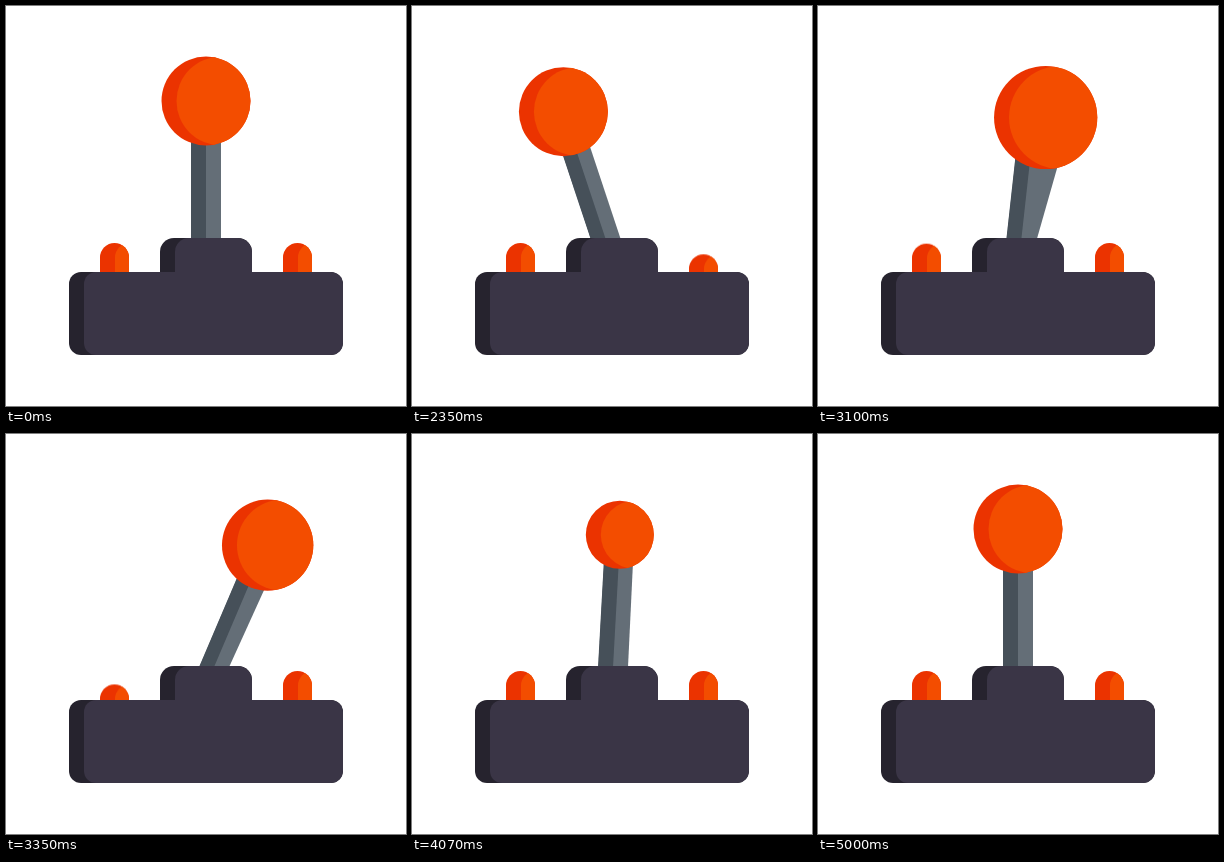
An HTML page without scripts that plays this animation: 400x400 px, repeating every 5.02 s.

```html
<!DOCTYPE html>
<html lang="en">
<head>
<meta charset="utf-8">
<title>Joystick</title>
<style>
@property --x { syntax: "<length>"; inherits: true; initial-value: 200px; }
@property --y { syntax: "<length>"; inherits: true; initial-value: 95px; }
@property --r { syntax: "<length>"; inherits: true; initial-value: 44.5px; }

html, body { margin: 0; width: 100%; height: 100%; overflow: hidden; background: #fff; }

.stage {
  --loop: 5020ms;
  --shade: 15px;
  position: relative;
  width: 400px;
  height: 400px;
  overflow: hidden;
  animation: swing-x var(--loop) infinite, swing-y var(--loop) infinite, depth var(--loop) infinite;
}
.stage div, .stage div::after { position: absolute; box-sizing: border-box; }
.stage div { overflow: hidden; }
.stage div::after { content: ""; inset: 0; }

/* Stick: quad from the ball centre down into the collar */
.stick {
  --half: max(14.5px, calc(15px + (var(--r) - 44.5px) * 1.53));
  --foot: calc(200px + (var(--x) - 200px) * .11);
  --left: calc(var(--x) - var(--half));
  inset: 0;
  background: #646e77;
  clip-path: polygon(
    var(--left) var(--y),
    calc(var(--x) + var(--half)) var(--y),
    calc(var(--foot) + 15px) 236px,
    calc(var(--foot) - 15px) 236px);
}
.stick::after {
  background: #465059;
  clip-path: polygon(
    var(--left) var(--y),
    calc(var(--left) + var(--shade)) var(--y),
    var(--foot) 236px,
    calc(var(--foot) - 15px) 236px);
}

.ball {
  inset: 0;
  background: #eb3300;
  clip-path: circle(var(--r) at var(--x) var(--y));
}
.ball::after {
  background: #f34d00;
  clip-path: circle(var(--r) at calc(var(--x) + var(--shade)) var(--y));
}

/* Solid parts: dark body with the same shape shifted right on top */
.stage .solid::after { left: var(--shade); border-radius: inherit; }
.base, .collar { background: #26232e; }
.base::after, .collar::after { background: #3a3546; }
.base { left: 63px; top: 266px; width: 274px; height: 83px; border-radius: 12px; }
.collar { left: 154px; top: 232px; width: 92px; height: 35px; border-radius: 14px 14px 0 0; }

.button {
  top: 237px;
  width: 29px;
  height: 30px;
  border-radius: 14.5px 14.5px 0 0;
  background: #eb3300;
}
.stage .button::after { right: -15px; background: #f34d00; }
.one { left: 94px; animation: press-left var(--loop) infinite; }
.two { left: 277px; animation: press-right var(--loop) infinite; }

@keyframes swing-x {
  0%, 39.8% { --x: 200px; animation-timing-function: cubic-bezier(.42, 0, .58, 1); }
  50.1% { --x: 138.5px; animation-timing-function: cubic-bezier(.5, 0, .5, 1); }
  69.3% { --x: 265px; animation-timing-function: cubic-bezier(.6, 0, .5, 1); }
  85.1%, 100% { --x: 200px; }
}
@keyframes swing-y {
  0%, 39.8% { --y: 95px; animation-timing-function: cubic-bezier(.6, 0, .6, 1); }
  50.1% { --y: 110px; animation-timing-function: linear; }
  61.8% { --y: 111.5px; animation-timing-function: linear; }
  69.3% { --y: 111px; animation-timing-function: ease-in-out; }
  74.3% { --y: 114px; animation-timing-function: cubic-bezier(.42, 0, .58, 1); }
  85.3% { --y: 95px; animation-timing-function: cubic-bezier(.4, 0, .7, 1); }
  89.4% { --y: 111.2px; animation-timing-function: cubic-bezier(.45, 0, .55, 1); }
  99.6%, 100% { --y: 95px; }
}
@keyframes depth {
  0%, 50.1% { --r: 44.5px; animation-timing-function: cubic-bezier(.42, 0, .8, .9); }
  59.8% { --r: 53.5px; animation-timing-function: cubic-bezier(.3, .2, .6, 1); }
  69.5% { --r: 44.5px; animation-timing-function: cubic-bezier(.3, .3, .5, 1); }
  78.7%, 81.7% { --r: 34px; animation-timing-function: cubic-bezier(.42, 0, .58, 1); }
  89.2% { --r: 53.5px; animation-timing-function: cubic-bezier(.45, 0, .55, 1); }
  99.6%, 100% { --r: 44.5px; }
}
@keyframes press-left {
  0%, 61% { transform: none; animation-timing-function: ease-in-out; }
  66% { transform: translateY(14px); animation-timing-function: ease-in-out; }
  71.3%, 100% { transform: none; }
}
@keyframes press-right {
  0%, 40.2% { transform: none; animation-timing-function: ease-in-out; }
  45.2% { transform: translateY(14px); animation-timing-function: ease-in-out; }
  50.6%, 89.7% { transform: none; animation-timing-function: ease-in-out; }
  94.6% { transform: translateY(14px); animation-timing-function: ease-in-out; }
  99.5%, 100% { transform: none; }
}
</style>
</head>
<body>
<main class="stage">
  <div class="stick"></div>
  <div class="ball"></div>
  <div class="solid button one"></div>
  <div class="solid button two"></div>
  <div class="solid collar"></div>
  <div class="solid base"></div>
</main>
</body>
</html>
```
